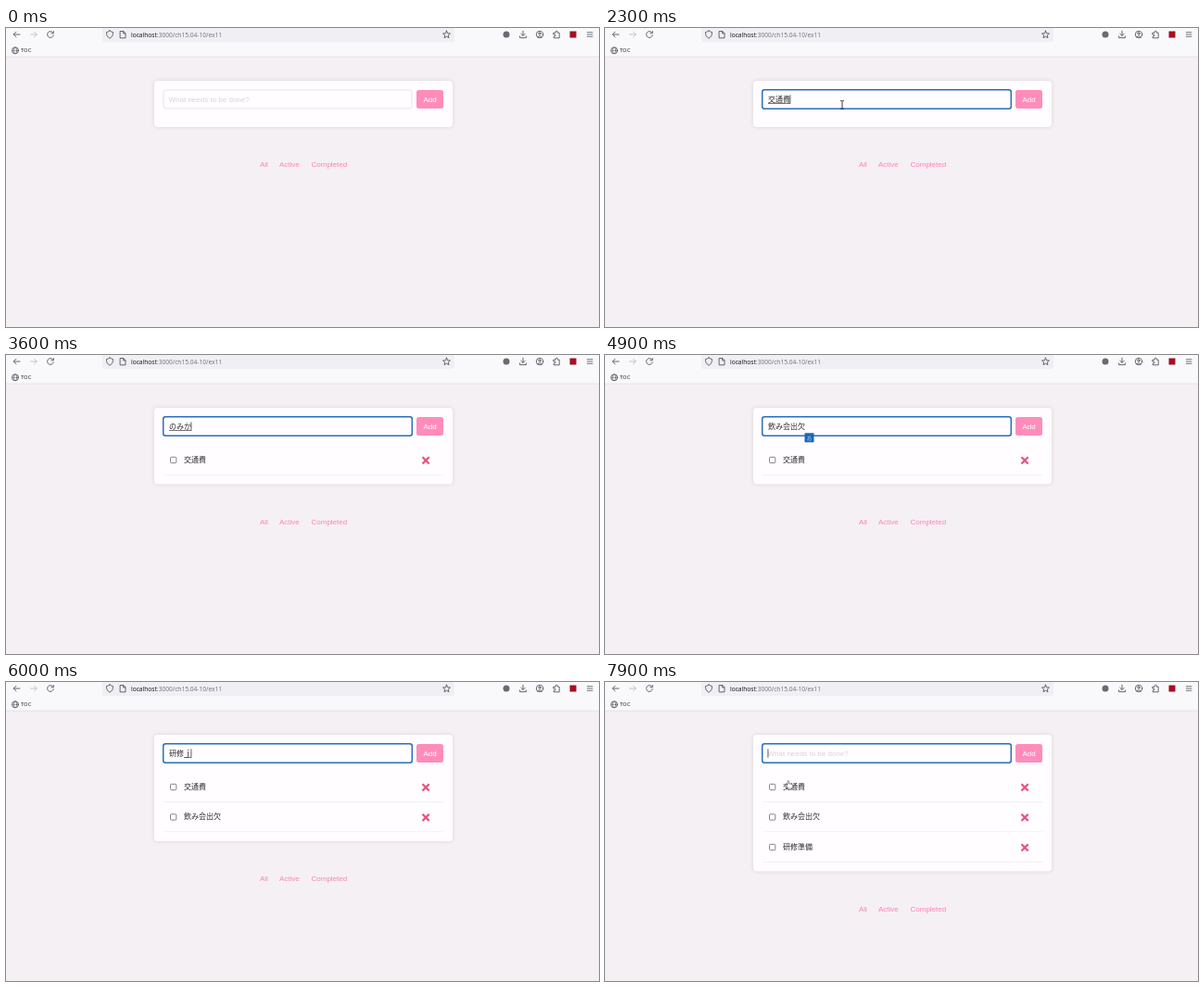
These frames come from a looping animation (640 by 323 pixels, 8 s). An HTML page:

```html
<!DOCTYPE html>
<html lang="ja">
<head>
<meta charset="utf-8">
<title>Todo</title>
<style>
  html, body { margin: 0; width: 100%; height: 100%; overflow: hidden; background: #f5f0f4; }
  svg { display: block; width: 640px; height: 323px; }
  text { font: 8px "Liberation Sans", Arial, sans-serif; white-space: pre; }
  .ui { font-family: "Noto Sans", "Open Sans", sans-serif; }
  .ja { font-family: "Noto Sans CJK JP", "Noto Sans CJK", sans-serif; fill: #2c2a2e; }
  .icon { fill: none; stroke: #55555f; stroke-width: .9; stroke-linecap: round; stroke-linejoin: round; }
  .card { filter: drop-shadow(0 0 2px rgba(90, 50, 80, .16)); }
  .links text { fill: #fb83b8; }
</style>
</head>
<body>
<svg viewBox="0 0 640 323">
  <rect width="640" height="323" fill="#f5f0f4"/>

  <!-- browser bar -->
  <rect width="640" height="31" fill="#f9f9fc"/>
  <rect y="30.7" width="640" height=".8" fill="#dedde4"/>
  <path d="M104 0H484V12.5Q484 15 481.500 15H106.500Q104 15 104 12.500Z" fill="#f0f0f4"/>
  <g class="icon">
    <path d="M15 7H8.300M11 4.200L8.200 7L11 9.800"/>
    <path d="M26.500 7H33.200M30.500 4.200L33.300 7L30.500 9.800" stroke="#bdbdc4"/>
    <path d="M50.600 4.800A3.400 3.400 0 1 0 51.300 7.800M51.300 3.500V5.800H49"/>
    <path d="M112 3Q113.700 4.300 115.500 4.500Q115.800 9.200 112 11.200Q108.200 9.200 108.500 4.500Q110.300 4.300 112 3Z"/>
    <path d="M123.500 3.500H126.800L129 5.700V10.800H123.500ZM126.600 3.600V5.900H128.900"/>
    <path id="star"/>
    <path d="M558 3.200V8.300M555.800 6.200L558 8.400L560.200 6.200M554.600 8.800V10.600H561.400V8.800"/>
    <circle cx="576" cy="7" r="3.700"/>
    <circle cx="576" cy="5.900" r="1.200"/>
    <path d="M573.700 9.700Q576 7.200 578.300 9.700"/>
    <path d="M591.200 5.200H593.200Q592.900 3.100 594.300 3.100Q595.700 3.100 595.400 5.200H597.200V10.800H591.200V9.100Q593.200 9.300 593.200 8Q593.200 6.800 591.200 7Z"/>
    <path d="M627.300 4.700H633M627.300 7H633M627.300 9.300H633" stroke-width=".8"/>
    <circle cx="10" cy="24.300" r="3.500"/>
    <ellipse cx="10" cy="24.300" rx="1.600" ry="3.500" stroke-width=".6"/>
    <path d="M6.500 24.300H13.500" stroke-width=".6"/>
  </g>
  <circle cx="540" cy="7" r="3.500" fill="#6a6a74"/>
  <rect x="608.500" y="3.500" width="7" height="7" fill="#a50f22"/>
  <text class="ui" x="135" y="9.700" style="font-size:6.600px" fill="#75757e"><tspan fill="#1c1b22">localhost</tspan>:3000/ch15.04-10/ex11</text>
  <text class="ui" x="16" y="26.400" style="font-size:5.800px" fill="#26252c">TOC</text>

  <!-- todo card -->
  <rect id="card" class="card" x="160" y="57" width="322" height="50" rx="4" fill="#fffdff"/>
  <rect id="field" x="170" y="67" width="268" height="20" rx="2.500" fill="#fffdff"/>
  <rect x="443" y="67" width="29" height="20" rx="2.500" fill="#ff8cba"/>
  <text x="457.500" y="80" text-anchor="middle" fill="#fff">Add</text>
  <text id="hint" x="175.500" y="80" fill="#d8d4d9">What needs to be done?</text>
  <text id="typed" class="ja" x="176" y="80"/>
  <rect id="under" y="81.200" height=".7" fill="#3a383c"/>
  <rect id="caret" y="72.300" width=".7" height="9.400" fill="#222"/>
  <g id="list"></g>
  <g id="links" class="links">
    <text x="274" y="150">All</text>
    <text x="295" y="150">Active</text>
    <text x="329.500" y="150">Completed</text>
  </g>

  <!-- input mode badge -->
  <g id="badge">
    <rect width="10" height="10"/>
    <text id="mode" class="ja" x="5" y="7.300" text-anchor="middle" style="font-size:6px;fill:#fff" opacity=".6"></text>
  </g>

  <g id="mouse">
    <path id="beam" d="M-2 -4.300H-.6L0 -3.800L.6 -4.300H2M0 -3.800V3.800M-2 4.300H-.6L0 3.800L.6 4.300H2" fill="none" stroke="#222" stroke-width=".9"/>
    <path id="arrow" d="M0 0V7.600L1.800 6L3 8.600L4.200 8L3 5.500H5.400Z" fill="#fff" stroke="#333" stroke-width=".6"/>
    <path id="hand" d="M0 .6Q.9 -.6 1.600 .6V3.200L5 4Q5.700 4.300 5.600 5.200L5 8.600H1L-1.600 5.400Q-1.200 4.400 0 5Z" fill="#fff" stroke="#444" stroke-width=".6"/>
  </g>
</svg>
<script>
const LOOP = 8000, STEP = 32.5, CHAR = 8, LEFT = 176;
const $ = id => document.getElementById(id);
const set = (el, attrs) => { for (const k in attrs) el.setAttribute(k, attrs[k]); };
const show = (el, on) => el.setAttribute("visibility", on ? "inherit" : "hidden");

// time, settled text, text still being composed
const keys = [
  [600, "", ""],
  [1600, "", "ｋ"], [1700, "", "こ"], [1800, "", "こう"], [1900, "", "こうｔ"],
  [2000, "", "こうつう"], [2100, "", "こうつうひ"], [2200, "", "交通費"],
  [2400, "交通費", ""], [2600, "", ""],
  [3000, "", "ｎ"], [3100, "", "の"], [3300, "", "のｍ"], [3400, "", "のみ"],
  [3600, "", "のみか"], [3700, "", "のみかい"], [3800, "", "飲み会"],
  [3900, "飲み会", "し"], [4000, "飲み会", "しゅ"], [4200, "飲み会", "しゅっけ"],
  [4300, "飲み会", "しゅっけつ"], [4400, "飲み会", "出欠"], [4600, "飲み会出欠", ""],
  [5200, "", ""],
  [5400, "", "ｋ"], [5500, "", "け"], [5600, "", "けん"], [5700, "", "けんｓ"],
  [5800, "", "けんしゅう"], [5900, "", "研修"], [6000, "研修", "ｊ"],
  [6100, "研修", "じゅ"], [6200, "研修", "じゅん"], [6400, "研修", "じゅんび"],
  [6500, "研修", "準備"], [6700, "研修準備", ""], [6900, "", ""]
];
const todos = [[2600, "交通費"], [5200, "飲み会出欠"], [6900, "研修準備"]];
const badges = [[1000, 1500, 175, 81, "#b5101c", "A"], [4800, 5100, 215.5, 84.3, "#1766b5", "あ"]];

const row = (name, i) => `<g transform="translate(0 ${i * STEP})">
  <rect x="177.500" y="110.300" width="6.300" height="6.300" rx="1" fill="#fff" stroke="#77747c" stroke-width=".9"/>
  <text class="ja" x="192" y="115.500">${name}</text>
  <path d="M449.500 110.300L456.700 117.500M456.700 110.300L449.500 117.500" stroke="#e8527f" stroke-width="2.300"/>
  <rect x="170" y="129" width="302" height=".6" fill="#eee8ed"/></g>`;
$("list").innerHTML = todos.map(([, name], i) => row(name, i)).join("");
const rows = [...$("list").children];

const starPoints = Array.from({ length: 10 }, (_, i) => {
  const r = i % 2 ? 1.9 : 4.2, a = i * Math.PI / 5;
  return `${475.5 + r * Math.sin(a)} ${7.3 - r * Math.cos(a)}`;
});
$("star").setAttribute("d", "M" + starPoints.join("L") + "Z");

const ease = (t, from, to) => {
  const p = Math.min(1, Math.max(0, (t - from) / (to - from)));
  return p * p * (3 - 2 * p);
};

function drawInput(t) {
  const key = keys.filter(k => k[0] <= t).pop();
  const [since, done, draft] = key || [0, "", ""];
  const badge = badges.find(b => t >= b[0] && t < b[1]);
  const end = LEFT + CHAR * (done.length + draft.length);
  set($("field"), key
    ? { x: 169.7, y: 66.7, width: 268.6, height: 20.6, stroke: "#2b6cbd", "stroke-width": 1.5 }
    : { x: 170, y: 67, width: 268, height: 20, stroke: "#ded8df", "stroke-width": .7 });
  show($("hint"), end === LEFT);
  $("typed").textContent = done + draft;
  set($("under"), { x: LEFT + CHAR * done.length, width: CHAR * draft.length });
  set($("caret"), { x: end - .4 });
  show($("caret"), key && !badge && (t - since) % 1000 < 500);
  show($("badge"), badge);
  if (badge) {
    const [, , x, y, fill, mode] = badge;
    set($("badge"), { transform: `translate(${x} ${y})` });
    set($("badge").firstElementChild, { fill });
    $("mode").textContent = mode;
  }
}

function drawList(t) {
  const count = todos.filter(d => d[0] <= t).length;
  rows.forEach((r, i) => show(r, i < count));
  set($("card"), { height: 50 + STEP * count });
  set($("links"), { transform: `translate(0 ${STEP * count})` });
}

function drawMouse(t) {
  const a = ease(t, 100, 500), b = ease(t, 7400, 7900);
  const x = 318 - 62 * a - 59 * b, y = 139 - 56 * a + 23.5 * b;
  const inField = y < 87, late = t > 7000;
  show($("mouse"), (t >= 100 && t < 2800) || t >= 7400);
  set($("mouse"), { transform: `translate(${x} ${y})` });
  show($("beam"), inField);
  show($("hand"), !inField && late && y > 98);
  show($("arrow"), !inField && !(late && y > 98));
}

function draw(t) {
  drawInput(t);
  drawList(t);
  drawMouse(t);
}

const start = performance.now();
function tick() {
  draw((performance.now() - start) % LOOP);
  requestAnimationFrame(tick);
}
draw(0);
requestAnimationFrame(tick);
</script>
</body>
</html>
```
